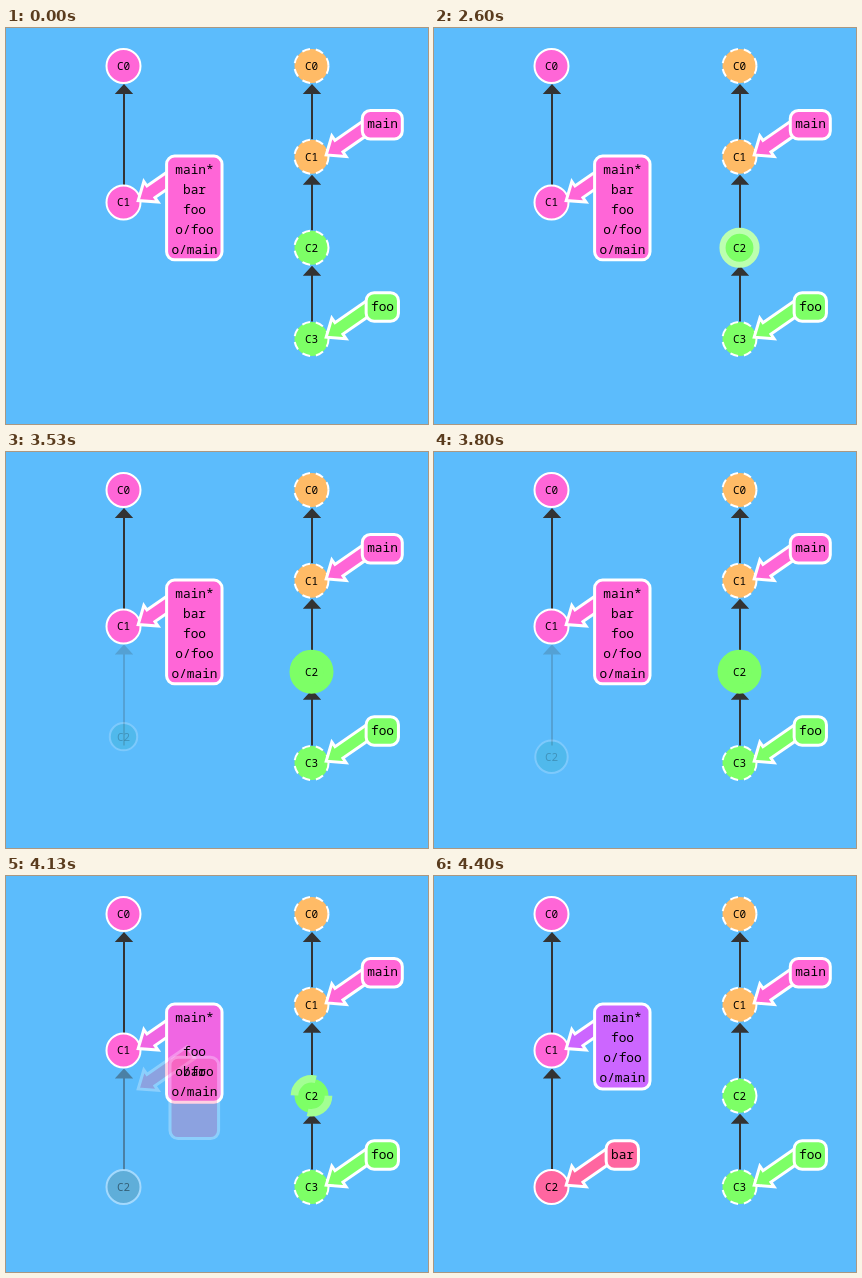
Write an HTML page that moves like this. It is 422 px wide and 396 px high and loops after 4470 ms.

```html
<!DOCTYPE html>
<html lang="en">
<head>
<meta charset="utf-8">
<title>Commit tree</title>
<style>
  html, body { margin: 0; width: 100%; height: 100%; overflow: hidden; background: #5cbcfc; }
  svg { display: block; width: 422px; height: 396px; }
  text { font-family: "Noto Sans Mono", "DejaVu Sans Mono", monospace; text-anchor: middle; fill: #000; }
  .id { font-size: 11px; font-weight: 500; }
  .name { font-size: 12.8px; font-weight: 300; }
</style>
</head>
<body>
<svg viewBox="0 0 422 396">
  <g id="edges" fill="#333"></g>
  <g id="nodes"></g>
  <g id="tags" stroke="#fff" stroke-width="3"></g>
  <g id="names"></g>
</svg>
<script>
const LOOP = 4470, FRAME = 1000 / 15;
const GLOW = 2330, BIRTH = 3337, SETTLE = 3995;
const LEFT = 117.5, RIGHT = 305.5, R = 17;
const PINK = [255, 102, 215], PURPLE = [204, 102, 255], ROSE = [255, 102, 160];
const ORANGE = [255, 187, 102], GREEN = [125, 255, 102], TEAL = [36, 178, 178], WHITE = [255, 255, 255];

const byId = id => document.getElementById(id);
const set = (el, attrs) => { for (const k in attrs) el.setAttribute(k, attrs[k]); return el; };
const add = (parent, tag, attrs) =>
  parent.appendChild(set(document.createElementNS("http://www.w3.org/2000/svg", tag), attrs));
const lerp = (a, b, p) => a + (b - a) * p;
const rgb = c => `rgb(${c.map(Math.round)})`;
const mix = (a, b, p) => rgb(a.map((v, i) => lerp(v, b[i], p)));
const part = (t, start, length) => Math.min(1, Math.max(0, (t - start) / length));

function easeInOut(n) {
  const q = 0.48 - n / 1.04, s = Math.sqrt(0.1734 + q * q);
  const t = Math.cbrt(s - q) + Math.cbrt(-s - q) + 0.5;
  return Math.min(1, Math.max(0, 3 * (1 - t) * t * t + t * t * t));
}

function bounce(n) {
  const k = 7.5625, d = 2.75;
  if (n < 1 / d) return k * n * n;
  if (n < 2 / d) return k * (n - 1.5 / d) ** 2 + 0.75;
  if (n < 2.5 / d) return k * (n - 2.25 / d) ** 2 + 0.9375;
  return k * (n - 2.625 / d) ** 2 + 0.984375;
}

function edge(nodeX, parentY, childY) {
  const x = nodeX + 0.5, top = parentY + 18, base = top + 10, end = childY - 17.5;
  return add(byId("edges"), "path", {
    d: `M${x} ${top}L${x + 9.2} ${base}H${x + 1}V${end}H${x - 1}V${base}H${x - 9.2}Z`
  });
}

const dash = w => `${4 * w} ${3 * w}`;

function node(id, x, y, fill, dashed) {
  const g = add(byId("nodes"), "g", { transform: `translate(${x} ${y})` });
  const circle = add(g, "circle", { r: R, fill: rgb(fill), stroke: "#fff", "stroke-width": 2 });
  if (dashed) circle.setAttribute("stroke-dasharray", dash(2));
  add(g, "text", { class: "id", y: 3.9 }).textContent = id;
  return { g, circle };
}

// Arrow and box, placed relative to the centre of a node.
function tag(x, y, fill) {
  const g = add(byId("tags"), "g", { transform: `translate(${x} ${y})`, fill: rgb(fill) });
  add(g, "path", {
    d: "M0 0L15.5 -12.5L15.5 -7H64V7H15.5L15.5 12.5Z",
    transform: "translate(14.7 -1.8) rotate(-34.7)"
  });
  return { g, rect: add(g, "rect", { rx: 8 }) };
}

const tagWidth = chars => 7.7 * chars + 9.2;
const tagHeight = lines => 18.8 * lines + 9.7;

function sizeTag(t, w, h) {
  set(t.rect, { x: 70.8 - w / 2, y: -46.3, width: w, height: h });
}

const nameY = y => y - 28.4;
const name = (s, x, y) => {
  const el = add(byId("names"), "text", { class: "name", x: x + 71, y: nameY(y) });
  el.textContent = s;
  return el;
};

// Left tree
const C1 = 174.4, C2 = 311;
edge(LEFT, 38, C1);
const newEdge = edge(LEFT, C1, C2);
const born = node("C2", LEFT, C1, TEAL);
node("C0", LEFT, 38, PINK);
node("C1", LEFT, C1, PINK);

// Right tree
const rows = [38, 128.8, 219.8, 311];
rows.slice(1).forEach((y, i) => edge(RIGHT, rows[i], y));
const [, , picked] = rows.map((y, i) => node("C" + i, RIGHT, y, i < 2 ? ORANGE : GREEN, true));

const stack = tag(LEFT, C1, PINK);
const bar = tag(LEFT, C1, ROSE);
[["main", rows[1], PINK], ["foo", rows[3], GREEN]].forEach(([s, y, fill]) => {
  sizeTag(tag(RIGHT, y, fill), tagWidth(s.length), tagHeight(1));
  name(s, RIGHT, y);
});
const names = ["main*", "bar", "foo", "o/foo", "o/main"].map((s, i) => name(s, LEFT, C1 + 20 * i));

function draw(t) {
  const glow = easeInOut(part(t, GLOW, 530));
  const p = easeInOut(part(t, SETTLE, 368));
  const settling = t >= SETTLE;

  // Highlight of the picked commit
  const width = lerp(lerp(2, 10, glow), 2, p);
  set(picked.circle, {
    "stroke-width": width,
    stroke: settling ? mix(GREEN, WHITE, p) : mix(WHITE, GREEN, glow),
    "stroke-dasharray": t < GLOW || settling ? dash(width) : "none"
  });

  // Birth of the copy
  const b = bounce(part(t, BIRTH, 601));
  const alpha = t < BIRTH ? 0 : lerp(0.2, 1, p);
  set(born.g, { transform: `translate(${LEFT} ${lerp(C1, C2, b)})` });
  set(born.circle, { r: R * b, fill: mix(TEAL, ROSE, p), opacity: alpha });
  set(born.g.lastChild, { opacity: alpha });
  set(newEdge, { opacity: alpha });

  // The branch leaves the shared box
  stack.g.setAttribute("fill", mix(PINK, PURPLE, p));
  sizeTag(stack, tagWidth(6), lerp(tagHeight(5), tagHeight(4), p));
  sizeTag(bar, lerp(tagWidth(6), tagWidth(3), p), lerp(tagHeight(5), tagHeight(1), p));
  bar.rect.setAttribute("y", lerp(18, 0, p) - 46.3);
  set(bar.g, { transform: `translate(${LEFT} ${lerp(C1, C2, p)})` });
  for (const el of bar.g.children) el.setAttribute("opacity", p);
  names.forEach((el, i) => {
    const from = C1 + 20 * i;
    const to = i === 1 ? C2 : i ? from - 20 : from;
    el.setAttribute("y", nameY(lerp(from, to, p)));
  });
}

const begin = performance.now();
function tick() {
  const t = (performance.now() - begin) % LOOP;
  draw(Math.floor((t + 4) / FRAME) * FRAME);
  requestAnimationFrame(tick);
}
tick();
</script>
</body>
</html>
```
